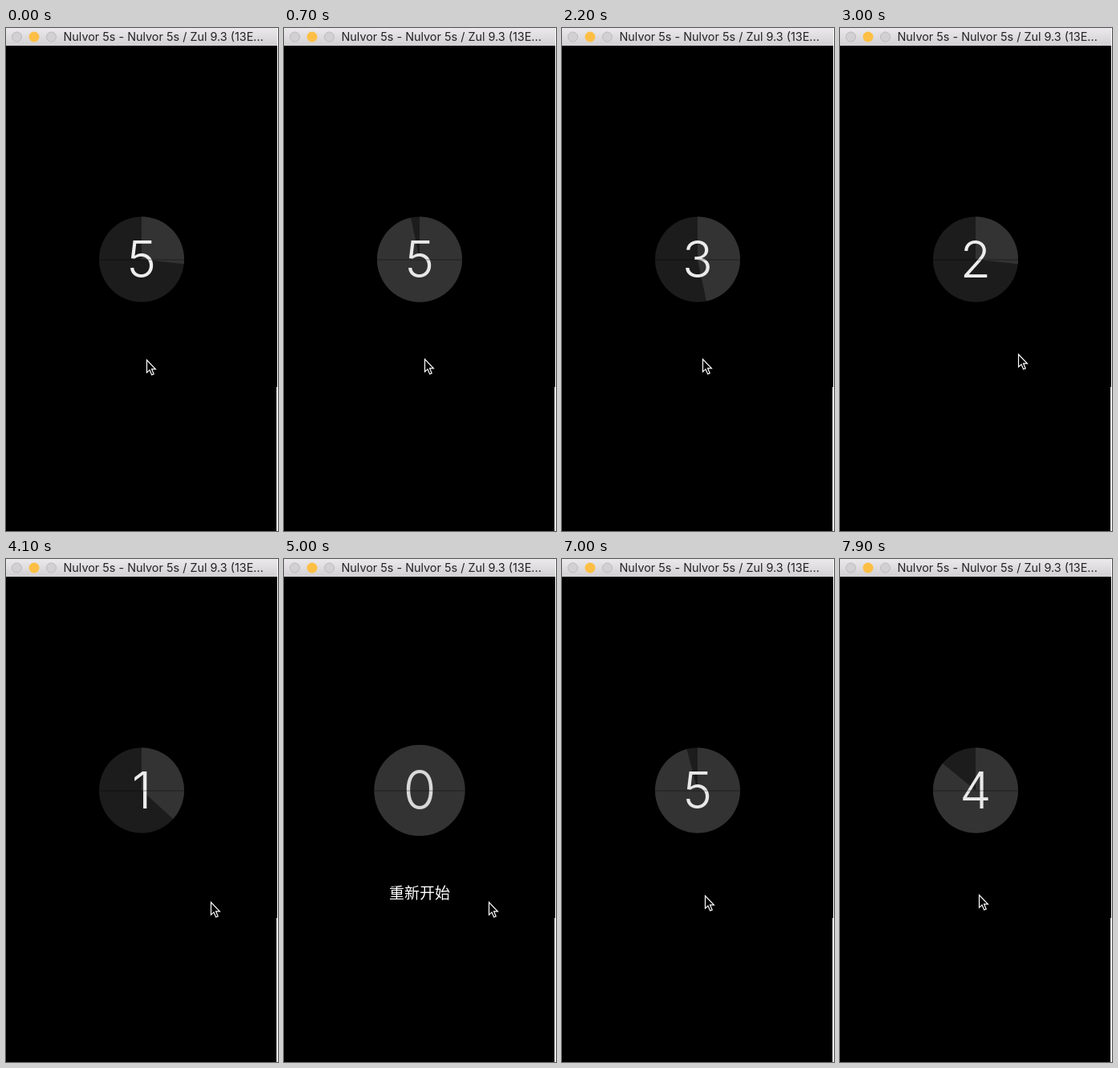
Animation of 339x625 px, one loop 8 s. Source, as an HTML page:

```html
<!DOCTYPE html>
<html lang="zh">
<head>
<meta charset="utf-8">
<title>Countdown</title>
<style>
  html, body { margin: 0; width: 100%; height: 100%; overflow: hidden; background: #000; }
  svg { display: block; width: 339px; height: 625px; }
  .title { font: 14.4px Inter, Roboto, sans-serif; fill: #242324; }
  .digit { font: 300 62.5px Inter, Roboto, sans-serif; text-anchor: middle; }
  .again { font: 19px "Noto Sans CJK SC", "Noto Sans CJK", sans-serif; fill: #fff; text-anchor: middle; }
</style>
</head>
<body>
<svg viewBox="0 0 339 625">
  <defs>
    <linearGradient id="bar" x2="0" y2="1">
      <stop offset="0" stop-color="#ebe9eb"/>
      <stop offset="1" stop-color="#d2d0d2"/>
    </linearGradient>
  </defs>
  <rect width="339" height="625"/>
  <rect width="339" height="22" fill="url(#bar)"/>
  <g fill="#d3d0d3" stroke="#bdbabd">
    <circle cx="13.5" cy="11" r="6"/>
    <circle cx="35" cy="11" r="6.5" fill="#fdbf45" stroke="none"/>
    <circle cx="56.5" cy="11" r="6"/>
  </g>
  <text class="title" x="71.5" y="16">Nulvor 5s - Nulvor 5s / Zul 9.3 (13E...</text>
  <rect x="338" width="1" height="625" fill="#fff"/>
  <rect x="337" y="446" width="1" height="179" fill="#dcdcdc"/>
  <g id="dial">
    <circle r="53" fill="#1c1c1c"/>
    <path id="wedge" fill="#333"/>
    <text id="digit" class="digit" y="22.2"></text>
    <path d="M-53 .5H53" stroke="#000" stroke-opacity=".4"/>
  </g>
  <text id="again" class="again" x="169" y="422">重新开始</text>
  <path id="cursor" d="M.5 .5V16.2L4 12.9L6.7 19L9.2 17.9L6.6 11.9H11.4Z" stroke="#fff" stroke-width="1.2"/>
</svg>
<script>
const LOOP = 8000, STEP = 100, R = 53;
const LEAD = 267;       // part of the first second already run
const RESTART = 6000, RERUN = 6041;
const ZERO = 5000 - LEAD;
const PULSE = 300;

// time, x, y of the pointer tip
const track = [
  [0, 175, 412], [400, 175, 412], [500, 175, 411], [2400, 175, 411],
  [3000, 222, 405], [3500, 255, 426], [5300, 255, 426],
  [5800, 178, 418], [7000, 178, 418], [7500, 173, 417], [LOOP, 173, 417]
];

const el = id => document.getElementById(id);
const [dial, wedge, digit, again, cursor] = ["dial", "wedge", "digit", "again", "cursor"].map(el);
const clamp = v => Math.min(1, Math.max(0, v));

function pointer(t) {
  const i = track.findIndex(k => k[0] > t);
  const [t0, x0, y0] = track[i - 1], [t1, x1, y1] = track[i];
  const u = (t - t0) / (t1 - t0), e = u * u * (3 - 2 * u);
  return [x0 + (x1 - x0) * e, y0 + (y1 - y0) * e];
}

function sector(part) {
  if (part >= 1) return `M0 ${-R}A${R} ${R} 0 1 1 0 ${R}A${R} ${R} 0 1 1 0 ${-R}Z`;
  const a = part * 2 * Math.PI;
  return `M0 0V${-R}A${R} ${R} 0 ${part > .5 ? 1 : 0} 1 ${R * Math.sin(a)} ${-R * Math.cos(a)}Z`;
}

function draw(t) {
  const run = Math.max(0, t < RESTART ? t + LEAD : t - RERUN) / 1000;
  const n = Math.max(0, 5 - Math.floor(run));
  const part = n ? run % 1 : 1;
  const sinceZero = t - ZERO;
  const scale = n ? 1 : 1 + .2 * Math.sin(Math.PI * clamp(sinceZero / PULSE));

  dial.setAttribute("transform", `translate(169 287.5) scale(${scale})`);
  wedge.setAttribute("d", sector(part));
  const grey = n ? 240 - 8 * part : 216;
  digit.textContent = n;
  digit.setAttribute("fill", `rgb(${grey},${grey},${grey})`);
  again.setAttribute("opacity", n ? 0 : clamp(sinceZero / 220));
  const [x, y] = pointer(t);
  cursor.setAttribute("transform", `translate(${Math.round(x)} ${Math.round(y)})`);
}

const start = performance.now();
function tick() {
  const t = (performance.now() - start) % LOOP;
  draw(Math.floor(t / STEP) * STEP);
  requestAnimationFrame(tick);
}
tick();
</script>
</body>
</html>
```
